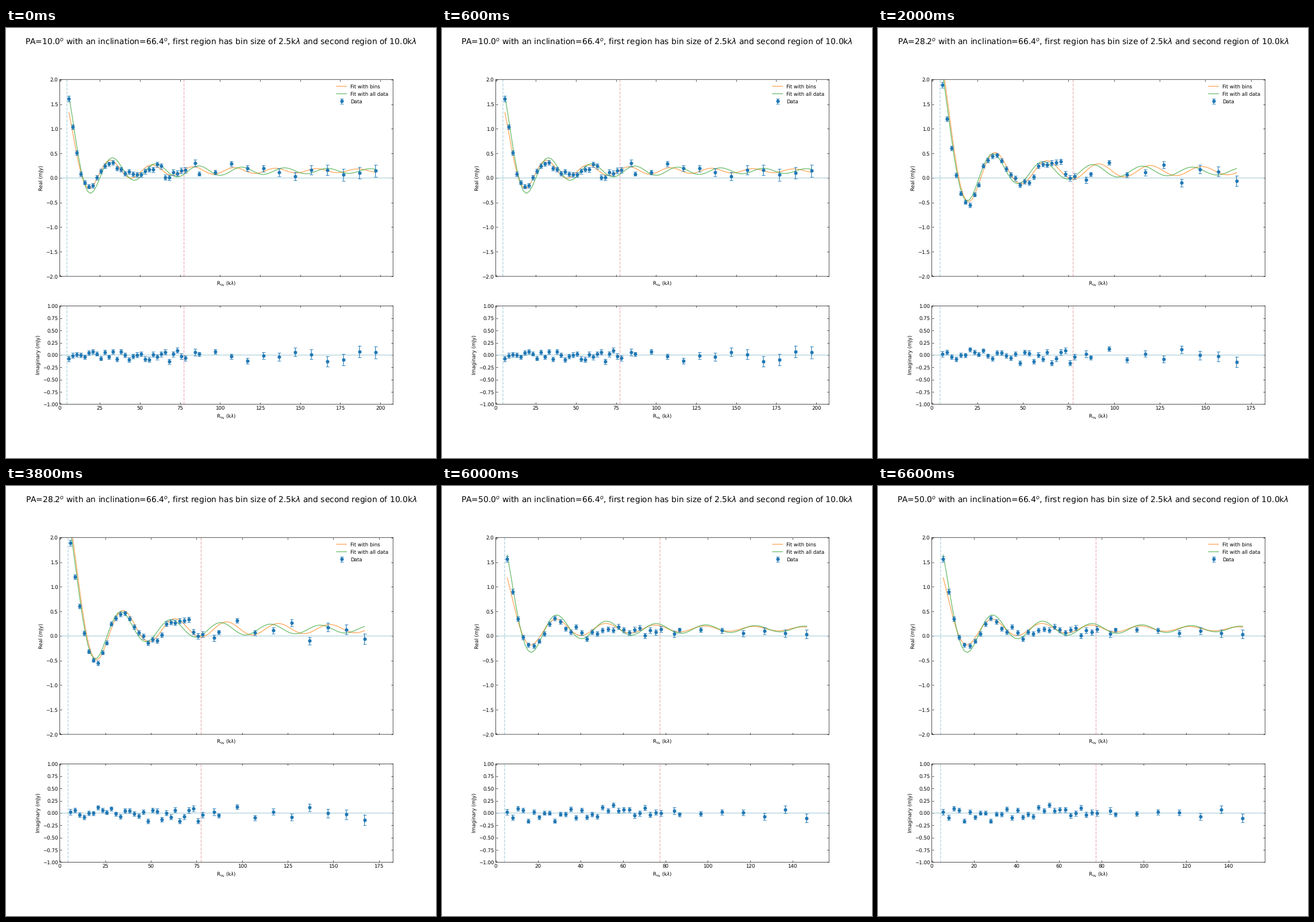
Recreate the animation shown at these times as a matplotlib script. Size 748x748 px, loop 7000 ms.

```python
import numpy as np
import matplotlib.pyplot as plt
from matplotlib.animation import FuncAnimation

SIZE, INCHES = 748, 12
INCL, BIN1, BIN2, SPLIT = 66.4, 2.5, 10.0, 77.5
BLUE, PALE, PINK = "tab:blue", "#b0d3dc", "#ecb4b9"
XLABEL = r"R$_{\rm uv}$ (k$\lambda$)"

plt.rcParams.update({
    "font.family": "DejaVu Sans",
    "text.hinting": "none", "path.snap": False,
    "xtick.direction": "in", "ytick.direction": "in",
    "xtick.top": True, "ytick.right": True,
})


def ring(x, offset, amp, k, phase=0.0, reach=np.inf):
    """Visibility of a ring: a sinc around an offset, optionally damped."""
    return offset + amp * np.exp(-x / reach) * np.sinc((k * x + phase) / np.pi)


class Scene:
    """Binned visibilities for one position angle, with two ring fits."""

    def __init__(self, pa, start, n_far, xmax, bins_fit, all_fit, sky, seed):
        self.pa, self.start, self.xmax = pa, start, xmax
        self.bins_fit, self.all_fit = bins_fit, all_fit

        near = start + BIN1 * (np.arange(30) + 0.5)
        edge = near[:1] + 78.75
        far = edge + BIN1 + BIN2 * np.arange(n_far)
        self.x = np.concatenate([near, edge, far])

        err_near = 0.042 + 0.018 * np.exp(-(near - 5) / 4) + 0.015 * (near / 78) ** 2
        err_far = 0.042 + 0.065 * ((far - far[0]) / 80) ** 1.3
        self.err = np.concatenate([err_near, [0.068], np.minimum(err_far, 0.12)])

        rng = np.random.default_rng(seed)
        noise = rng.normal(0, 1, (2, self.x.size)).clip(-2, 2)
        calm = np.minimum(1, self.x / 40)
        self.real = ring(self.x, *sky) + 0.07 * calm * noise[0]
        self.imag = 0.08 * noise[1]


scenes = [
    Scene(10.0, 4.48, 12, 207.9, (0.148, 1.68, 0.2448), (0.143, 2.10, 0.2350),
          sky=(0.15, 2.45, 0.235, 0.10, 40), seed=1),
    Scene(20.0, 4.35, 10, 192.8, (0.145, 2.23, 0.2200), (0.140, 2.63, 0.2340),
          sky=(0.13, 2.45, 0.210, 0.35), seed=2),
    Scene(28.2, 4.58, 9, 182.7, (0.145, 2.92, 0.2227), (0.137, 2.78, 0.2308),
          sky=(0.12, 2.85, 0.210, 0.40), seed=3),
    Scene(29.999999999999996, 4.47, 9, 180.1,
          (0.145, 2.92, 0.2222), (0.137, 2.77, 0.2312),
          sky=(0.12, 2.85, 0.210, 0.40), seed=4),
    Scene(50.0, 4.17, 7, 157.2, (0.147, 1.53, 0.2710), (0.145, 2.21, 0.2693),
          sky=(0.13, 2.50, 0.260, 0.10, 40), seed=5),
]
# One entry per second; the best angle is held longer.
order = [0, 1, 2, 2, 2, 3, 4]

fig, (ax_re, ax_im) = plt.subplots(
    2, 1, figsize=(INCHES, INCHES), dpi=SIZE / INCHES,
    gridspec_kw=dict(height_ratios=[2, 1], hspace=0.2,
                     left=0.125, right=0.9, bottom=0.125, top=0.88))
title = fig.suptitle("", fontsize=16)


def panel(ax, s, values, name, ylim, step):
    ax.clear()
    ax.axhline(0, color=PALE, lw=1.5)
    ax.axvline(s.start, color=PALE, ls="--", lw=1.5)
    ax.axvline(SPLIT, color=PINK, ls="--", lw=1.5)
    ax.errorbar(s.x, values, yerr=s.err, fmt="o", color=BLUE, capsize=3,
                elinewidth=1.3, zorder=3, label="Data")
    ax.set(xlim=(0, s.xmax), ylim=(-ylim, ylim), ylabel=f"{name} (mJy)",
           yticks=np.arange(-ylim, ylim + step / 2, step))


def draw(i):
    s = scenes[order[i]]
    title.set_text(
        f"PA={s.pa}$^o$ with an inclination={INCL}$^o$, first region has bin "
        f"size of {BIN1}k$\\lambda$ and second region of {BIN2}k$\\lambda$")

    panel(ax_re, s, s.real, "Real", 2, 0.5)
    x = np.linspace(s.x[0], s.x[-1], 100)
    ax_re.plot(x, ring(x, *s.bins_fit), color="tab:orange", alpha=0.7,
               label="Fit with bins")
    ax_re.plot(x, ring(x, *s.all_fit), color="tab:green", alpha=0.7,
               label="Fit with all data")
    ax_re.tick_params(labelbottom=False)
    ax_re.set_xlabel(XLABEL, labelpad=7.5)
    ax_re.legend(loc="upper right", frameon=False)

    panel(ax_im, s, s.imag, "Imaginary", 1, 0.25)
    ax_im.set_xlabel(XLABEL)
    return []


anim = FuncAnimation(fig, draw, frames=len(order), init_func=lambda: draw(0),
                     interval=1000, repeat=True, repeat_delay=0, blit=False)
plt.show()
```
